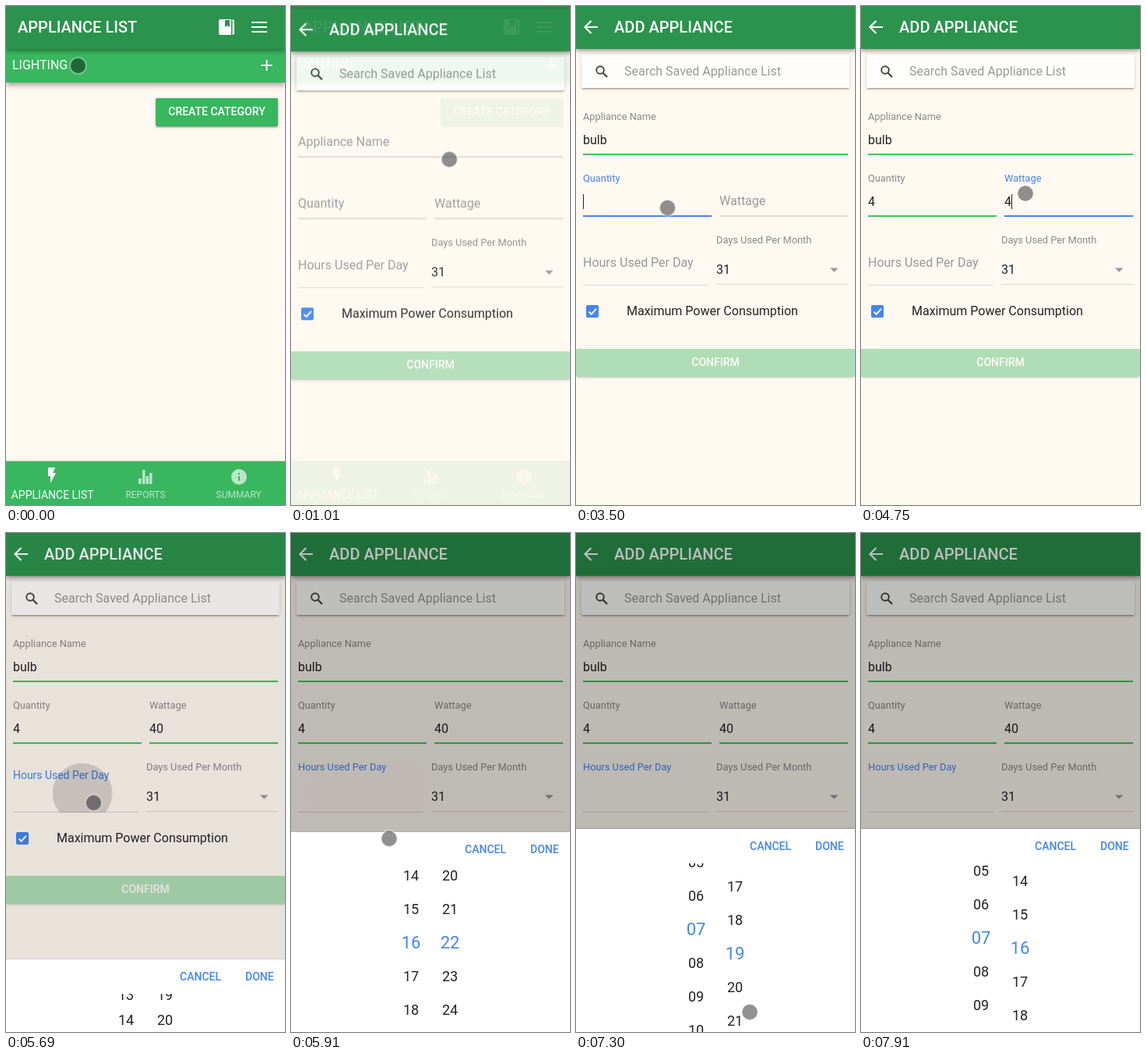
Recreate the animation shown at these times as an HTML page. Size 358x639 px, loop 8000 ms.

```html
<!DOCTYPE html>
<html lang="en">
<head>
<meta charset="utf-8">
<title>Appliance list</title>
<style>
:root { --green: #38b75f; --dark: #2b934d; --blue: #4285f4; --cream: #fff9f1; --idle: #e0dcd6; --valid: #38c95c;
  --lift: 0 2px 2px rgba(0,0,0,.14), 0 3px 1px -2px rgba(0,0,0,.2), 0 1px 5px rgba(0,0,0,.12); }
html, body { margin: 0; width: 100%; height: 100%; overflow: hidden; }
body { position: relative; font: 16px/20px Roboto, sans-serif; color: #222; }
#stage { position: absolute; left: 0; top: 0; width: 358px; height: 639px; overflow: hidden; background: var(--cream); }
#stage * { position: absolute; box-sizing: border-box; white-space: nowrap; }
svg { overflow: visible; left: 0; top: 0; }
.page { inset: 0; background: var(--cream); }
.header { left: 0; top: 0; width: 358px; height: 55px; background: var(--dark); box-shadow: 0 2px 6px rgba(0,0,0,.45); }
.title { top: 17px; font-size: 20px; font-weight: 500; color: #fff; }
.btn { height: 36px; line-height: 35px; border-radius: 2px; background: var(--green); color: #fff;
  font-size: 14px; font-weight: 500; text-align: center; box-shadow: var(--lift); }
.group { left: 0; top: 55px; width: 358px; height: 43px; background: var(--green); color: #fff; box-shadow: 0 3px 7px rgba(0,0,0,.4); }
.tabs { left: 0; top: 583px; width: 358px; height: 56px; background: var(--green); color: #fff; box-shadow: 0 -1px 2px rgba(0,0,0,.15); }
.tabs span { top: 33px; width: 119.33px; text-align: center; font-size: 12px; opacity: .65; }
.search { left: 7px; top: 62px; width: 344px; height: 43px; background: #fffefd; border-radius: 2px; box-shadow: var(--lift); }
.label { color: #999; transform-origin: 0 50%; }
.small { transform: scale(.8); }
.line { height: 2px; background: var(--idle); }
.thin { height: 1px; background: #dcd8d2; }
.text { height: 19px; line-height: 19px; overflow: hidden; width: 0; border-right: 1px solid transparent; }

.label, .line, .text, #form, #ripple, #shade, #picker, #cursor { animation: 8s linear infinite both; }

#form { animation-name: enter; }
@keyframes enter {
  0%, 11.06% { opacity: 0; transform: translateY(40px); animation-timing-function: cubic-bezier(.36,.66,.04,1); }
  14.56%, 100% { opacity: 1; transform: none; }
}

#nameLabel { animation-name: nameLabel; }
@keyframes nameLabel {
  0%, 19.3% { transform: none; color: #999; animation-timing-function: ease-in-out; }
  21.2%, 41.6% { transform: translateY(-29px) scale(.8); color: var(--blue); }
  41.61%, 100% { transform: translateY(-29px) scale(.8); color: #8c8a86; }
}
#qtyLabel { animation-name: qtyLabel; }
@keyframes qtyLabel {
  0%, 41.6% { transform: none; color: #999; animation-timing-function: ease-in-out; }
  43.5%, 50.6% { transform: translateY(-29px) scale(.8); color: var(--blue); }
  50.61%, 100% { transform: translateY(-29px) scale(.8); color: #8c8a86; }
}
#wattLabel { animation-name: wattLabel; }
@keyframes wattLabel {
  0%, 50.6% { transform: none; color: #999; animation-timing-function: ease-in-out; }
  52.5%, 69.9% { transform: translateY(-29px) scale(.8); color: var(--blue); }
  69.91%, 100% { transform: translateY(-29px) scale(.8); color: #8c8a86; }
}
#hoursLabel { animation-name: hoursLabel; }
@keyframes hoursLabel {
  0%, 70% { transform: none; color: #999; }
  70.01% { transform: none; color: var(--blue); animation-timing-function: ease-in-out; }
  71.94%, 100% { transform: translateY(-29px) scale(.8); color: var(--blue); }
}

#nameLine { animation-name: nameLine; animation-timing-function: step-end; }
@keyframes nameLine { 0% { background: var(--idle); } 19.3% { background: var(--blue); } 41.6%, 100% { background: var(--valid); } }
#qtyLine { animation-name: qtyLine; animation-timing-function: step-end; }
@keyframes qtyLine { 0% { background: var(--idle); } 41.6% { background: var(--blue); } 50.6%, 100% { background: var(--valid); } }
#wattLine { animation-name: wattLine; animation-timing-function: step-end; }
@keyframes wattLine { 0% { background: var(--idle); } 50.6% { background: var(--blue); } 69.9%, 100% { background: var(--valid); } }

/* typed text: the width uncovers letters, the right border is the caret */
.text { animation-timing-function: step-end; }
#nameText { animation-name: nameText; }
@keyframes nameText {
  0% { width: 1px; border-color: transparent; }
  20.4% { width: 1px; border-color: #222; }
  25.9% { width: 10px; border-color: #222; }
  28.1% { width: 19px; border-color: #222; }
  30% { width: 23px; border-color: #222; }
  32.1% { width: 32px; border-color: #222; }
  41.6%, 100% { width: 32px; border-color: transparent; }
}
#qtyText { animation-name: qtyText; }
@keyframes qtyText {
  0% { width: 1px; border-color: transparent; }
  42.4% { width: 1px; border-color: #222; }
  45.8% { width: 10px; border-color: #222; }
  50.6%, 100% { width: 10px; border-color: transparent; }
}
#wattText { animation-name: wattText; }
@keyframes wattText {
  0% { width: 1px; border-color: transparent; }
  51.5% { width: 1px; border-color: #222; }
  59.3% { width: 10px; border-color: #222; }
  64.1% { width: 19px; border-color: #222; }
  69.9%, 100% { width: 19px; border-color: transparent; }
}

#ripple { left: 48px; top: -9px; width: 100px; height: 100px; border-radius: 50%; background: #000; animation-name: ripple; }
@keyframes ripple {
  0%, 69% { transform: scale(0); opacity: .15; }
  71.12% { transform: scale(.76); opacity: .15; }
  72.4% { transform: scale(1.2); opacity: .1; }
  74%, 100% { transform: scale(1.5); opacity: 0; }
}
#shade { inset: 0; background: #000; animation-name: shade; }
@keyframes shade {
  0%, 70.38% { opacity: 0; animation-timing-function: cubic-bezier(.36,.66,.04,1); }
  75.38%, 100% { opacity: .26; }
}
#picker { left: 0; top: 379px; width: 358px; height: 260px; background: #fff; box-shadow: 0 -1px 1px rgba(0,0,0,.12); animation-name: rise; }
@keyframes rise {
  0%, 70.38% { transform: translateY(262px); animation-timing-function: cubic-bezier(.36,.66,.04,1); }
  75.38%, 100% { transform: none; }
}
#picker > b { top: 12px; font-size: 14px; font-weight: 500; color: var(--blue); }
.wheel { top: 44px; width: 50px; height: 216px; overflow: hidden; }
.wheel span { left: 0; top: 88px; width: 50px; text-align: center; font-size: 18px; }
.wheel .on { font-size: 22px; color: var(--blue); }

#cursor { left: -11px; top: -11px; width: 22px; height: 22px; border-radius: 50%; background: rgba(0,0,0,.43) padding-box;
  border: 1.5px solid rgba(255,255,255,.6); animation-name: point; }
@keyframes point {
  0%, 1.8% { transform: translate(92.5px, 76.5px); animation-timing-function: ease-in-out; }
  8.6%, 10.5% { transform: translate(334px, 76px); animation-timing-function: ease-in; }
  12.63% { transform: translate(203.5px, 196.5px); animation-timing-function: ease-out; }
  17.2%, 35% { transform: translate(93.5px, 171.5px); }
  35.9%, 37% { transform: translate(98.5px, 169px); animation-timing-function: ease-in-out; }
  41.2%, 45.9% { transform: translate(117.5px, 258.5px); }
  47.6% { transform: translate(252.5px, 255.5px); animation-timing-function: ease-out; }
  48.5%, 50.6% { transform: translate(258px, 255.5px); }
  52.5%, 55.8% { transform: translate(208px, 248px); }
  56.5%, 64% { transform: translate(211px, 240px); animation-timing-function: ease-in-out; }
  68.8%, 69.2% { transform: translate(98px, 333px); }
  71%, 72% { transform: translate(112.5px, 345.5px); animation-timing-function: ease-in-out; }
  77%, 77.5% { transform: translate(158px, 500px); }
  80.6% { transform: translate(160px, 626px); }
  83.5% { transform: translate(187.5px, 604.5px); }
  86.25% { transform: translate(213px, 520px); }
  89.4% { transform: translate(223px, 600px); }
  93%, 95% { transform: translate(223px, 626px); opacity: 1; }
  95.1%, 100% { transform: translate(223px, 626px); opacity: 0; }
}
</style>
</head>
<body>
<div id="stage">
  <div class="page">
    <div class="group">
      <span style="left:8px;top:11px">LIGHTING</span>
      <svg width="358" height="43"><path d="M327.500 21h14M334.500 14v14" stroke="#fff" stroke-width="2"/></svg>
    </div>
    <div class="header">
      <span class="title" style="left:15px">APPLIANCE LIST</span>
      <svg width="358" height="55" fill="#fff">
        <path d="M275 17h14v20h-14q-2 0-2-2v-16q0-2 2-2zM290.500 17q2.500 0 2.500 2v16q0 2-2.500 2z"/>
        <path d="M281 18h6v9l-3-2-3 2z" fill="#2b934d"/>
        <path d="M315 20h20v2h-20zM315 26h20v2h-20zM315 32h20v2h-20z"/>
      </svg>
    </div>
    <div class="btn" style="left:192px;top:118px;width:157px">CREATE CATEGORY</div>
    <div class="tabs">
      <svg width="358" height="56" fill="#fff">
        <path d="M54 8h9l-3 7h4l-7 13v-9h-3z"/>
        <g opacity=".65">
          <path d="M170 22h3.500v7h-3.500zM175 11h3.500v18h-3.500zM179.500 19h3.500v10h-3.500zM184 15h3.500v14h-3.500z"/>
          <circle cx="299" cy="20" r="10"/>
        </g>
        <path d="M298 15h2v2h-2zM298 19h2v6h-2z" fill="#38b75f"/>
      </svg>
      <span style="left:0;font-size:14px;opacity:1">APPLIANCE LIST</span>
      <span style="left:119.300px">REPORTS</span>
      <span style="left:239px">SUMMARY</span>
    </div>
  </div>

  <div class="page" id="form">
    <div class="search"><span style="left:55px;top:12px;color:#999">Search Saved Appliance List</span></div>
    <div class="header">
      <span class="title" style="left:49px">ADD APPLIANCE</span>
      <svg width="358" height="55" fill="none" stroke="#fff" stroke-width="2.200"><path d="M28 27h-16M19.500 19l-8 8 8 8"/></svg>
    </div>

    <span class="label" id="nameLabel" style="left:9px;top:161px">Appliance Name</span>
    <span class="text" id="nameText" style="left:9px;top:162px">bulb</span>
    <div class="line" id="nameLine" style="left:9px;top:189px;width:340px"></div>

    <span class="label" id="qtyLabel" style="left:9px;top:240px">Quantity</span>
    <span class="text" id="qtyText" style="left:9px;top:241px">4</span>
    <div class="line" id="qtyLine" style="left:9px;top:268px;width:165px"></div>

    <span class="label" id="wattLabel" style="left:184px;top:240px">Wattage</span>
    <span class="text" id="wattText" style="left:184px;top:241px">40</span>
    <div class="line" id="wattLine" style="left:184px;top:268px;width:165px"></div>

    <span class="label" id="hoursLabel" style="left:9px;top:319px">Hours Used Per Day</span>
    <div class="thin" style="left:9px;top:357px;width:161px"></div>
    <div style="left:0;top:292px;width:175px;height:66px;overflow:hidden"><div id="ripple"></div></div>

    <span class="label small" style="left:180px;top:290px;color:#8c8a86">Days Used Per Month</span>
    <span style="left:180px;top:328px">31</span>
    <div class="thin" style="left:180px;top:356px;width:169px"></div>

    <span style="left:65px;top:381px">Maximum Power Consumption</span>
    <svg width="358" height="639" fill="none">
      <path d="M326 335.500h10.500l-5.250 5.250z" fill="#999"/>
      <circle cx="31" cy="82" r="4.800" stroke="#444" stroke-width="1.900"/>
      <path d="M34.500 85.500l5.500 5.500" stroke="#444" stroke-width="2.300"/>
      <rect x="13" y="383" width="16" height="16" rx="2" fill="#4285f4"/>
      <path d="M16.500 391.500l3.200 3.200 6.300-7" stroke="#fff" stroke-width="2"/>
    </svg>
    <div style="left:0;top:439px;opacity:.4"><div class="btn" style="width:358px">CONFIRM</div></div>
  </div>

  <div id="shade"></div>
  <div id="picker">
    <b style="left:223px">CANCEL</b><b style="left:307px">DONE</b>
    <div class="wheel" style="left:129px"></div>
    <div class="wheel" style="left:179px"></div>
  </div>
  <div id="cursor"></div>
</div>
<script>
const LOOP = 8000, SLOTS = 11;

// A drag followed by a friction glide towards `rest`.
const wheels = [
  { start: 16, drag: 6200, release: 6450, left: 13, rest: 7, friction: .0035, max: 23 },
  { start: 22, drag: 6900, release: 7150, left: 20.3, rest: 15, friction: .0026, max: 59 }
];
document.querySelectorAll('.wheel').forEach((el, i) => {
  wheels[i].slots = Array.from({ length: SLOTS }, () => el.appendChild(document.createElement('span')));
});

const ramp = (t, a, b) => Math.min(1, Math.max(0, (t - a) / (b - a)));

function position(w, t) {
  if (t < w.release) return w.start + (w.left - w.start) * ramp(t, w.drag, w.release);
  return w.rest + (w.left - w.rest) * Math.exp(-w.friction * (t - w.release));
}

function turn(w, t) {
  const pos = position(w, t), near = Math.round(pos);
  const pitch = 32 + 11 * ramp(t, 5700, 5850);
  w.slots.forEach((el, i) => {
    const value = near + i - (SLOTS >> 1);
    el.textContent = value < 0 || value > w.max ? '' : String(value).padStart(2, '0');
    el.className = value === near ? 'on' : '';
    el.style.transform = `translateY(${(value - pos) * pitch}px)`;
  });
}

let begin;
function tick(now) {
  begin ??= now;
  const t = (now - begin) % LOOP;
  wheels.forEach(w => turn(w, t));
  requestAnimationFrame(tick);
}
requestAnimationFrame(tick);
</script>
</body>
</html>
```
